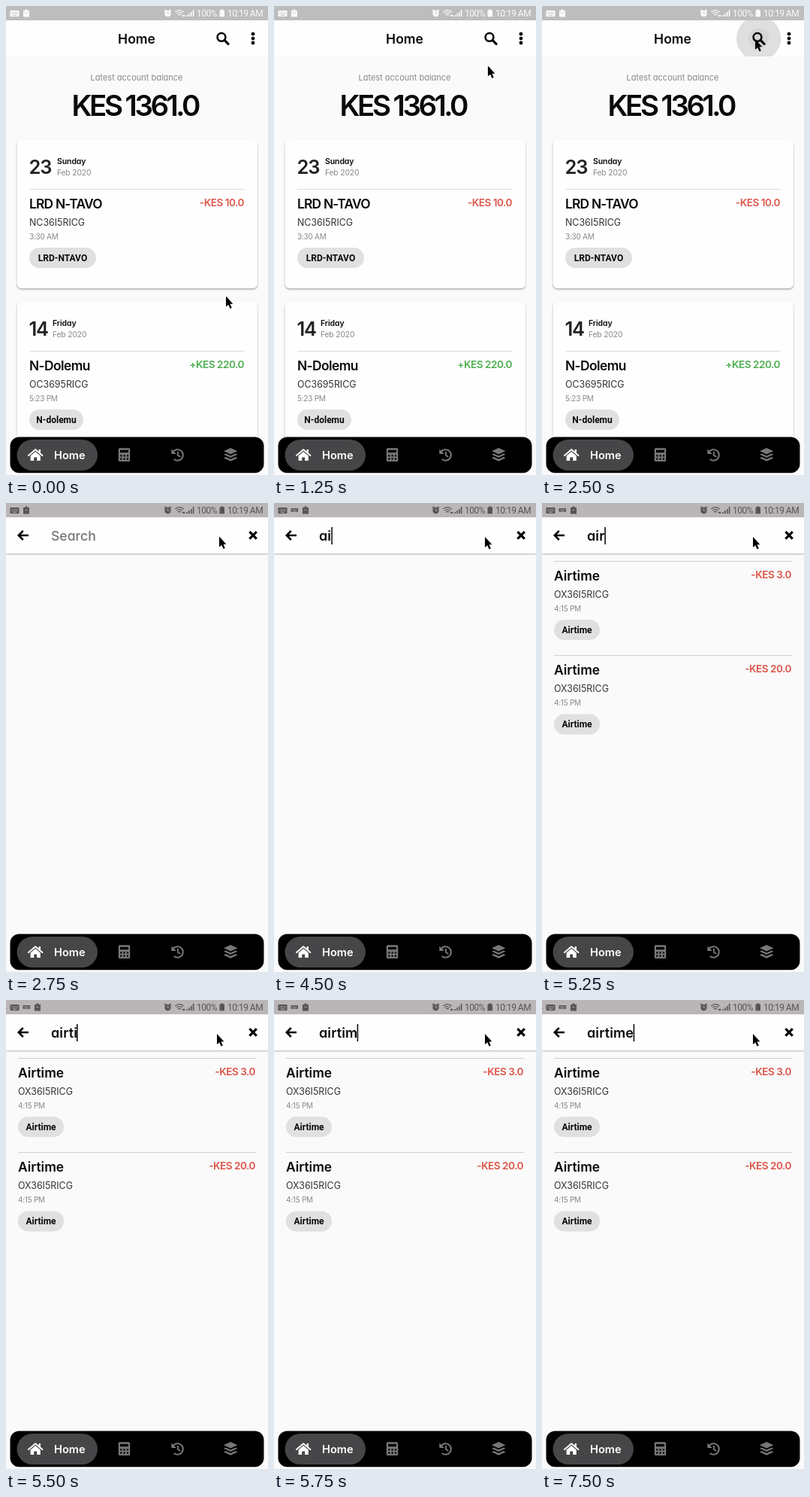
These frames come from a looping animation (349x623 px, 8000 ms). An HTML page:

```html
<!DOCTYPE html>
<html lang="en">
<head>
<meta charset="utf-8">
<title>Account search</title>
<style>
html, body { margin: 0; width: 100%; height: 100%; overflow: hidden; background: #fafafa; }
svg { display: block; width: 100%; height: 100%; }
text { font-family: Inter, "Open Sans", sans-serif; font-feature-settings: "cv11"; white-space: pre; }
.rb { font-family: Roboto, sans-serif; }
.m { font-weight: 500; }
.b { font-weight: 600; }
</style>
</head>
<body>
<svg id="stage" viewBox="0 0 349 623">
  <defs>
    <filter id="soft" x="-10%" y="-10%" width="120%" height="120%"><feGaussianBlur stdDeviation="1.2"/></filter>
    <clipPath id="head"><rect y="19" width="349" height="48"/></clipPath>
    <g id="board">
      <rect width="12" height="8" rx="1.2" fill="currentColor"/>
      <path d="M1.8 2.5H10.2M1.8 4.3H10.2" stroke="var(--bar)" stroke-width=".9" stroke-dasharray="1.1 .7"/>
      <path d="M3.4 6.3H8.6" stroke="var(--bar)"/>
    </g>
    <g id="cell">
      <path d="M2.5 0H5.5V1.5H8V10H0V1.5H2.5Z" fill="currentColor"/>
      <path d="M2.2 4.8H5.8" stroke="var(--bar)" stroke-width=".7"/>
    </g>
  </defs>
  <rect width="349" height="623" fill="#fafafa"/>
  <g id="home">
    <rect y="19" width="349" height="48" fill="#fefefe"/>
    <g fill="#060606">
      <circle cx="329" cy="37.2" r="2.4"/><circle cx="329" cy="43.1" r="2.4"/><circle cx="329" cy="49" r="2.4"/>
    </g>
    <g clip-path="url(#head)">
      <circle id="wave" cx="288.7" cy="43" r="29.7" fill="#000" opacity=".12"/>
      <circle id="press" cx="288.7" cy="43" r="14" fill="#000" opacity=".04"/>
    </g>
    <circle cx="287" cy="41.4" r="5.4" fill="none" stroke="#060606" stroke-width="2.6"/>
    <path d="M291 45.4L296 50.4" stroke="#060606" stroke-width="3.2" stroke-linecap="round"/>
  </g>
  <g id="search">
    <g id="results"></g>
    <rect y="20" width="349" height="48" fill="#000" opacity=".28" filter="url(#soft)"/>
    <rect y="19" width="349" height="48" fill="#fefefe"/>
    <path d="M30 43H17M22.8 37L16.8 43L22.8 49" fill="none" stroke="#060606" stroke-width="2.6"/>
    <path d="M324.4 38.2L333.8 47.6M333.8 38.2L324.4 47.6" stroke="#060606" stroke-width="3.2"/>
    <rect id="caret" y="32" width="1.6" height="23" fill="#111"/>
  </g>
  <g id="nav">
    <rect x="5.5" y="572.6" width="338" height="47.6" rx="12" fill="#000"/>
    <rect x="14.5" y="576" width="107.5" height="41" rx="20.5" fill="#464547"/>
    <path d="M30 597L39.2 589.3L48.4 597" fill="none" stroke="#fff" stroke-width="2" stroke-linejoin="round" stroke-linecap="round"/>
    <path d="M43.6 589H46V594L43.6 592Z" fill="#fff"/>
    <path d="M32.6 597.4L39.2 591.9L45.8 597.4V604H41.2V599.5H37.2V604H32.6Z" fill="#fff"/>
    <rect x="149.8" y="587.3" width="15.4" height="17.8" rx="1.6" fill="#777"/>
    <path d="M152 591.5H163" stroke="#000" stroke-width="3.4"/>
    <path d="M152.2 597.3H163M152.2 601.7H163" stroke="#000" stroke-width="2.2" stroke-dasharray="2.2 2.1"/>
    <g fill="none" stroke="#777">
      <path d="M222.6 592.2A7.3 7.3 0 1 1 223.7 602" stroke-width="2.1"/>
      <path d="M229 592V596.7L232.2 599" stroke-width="1.9"/>
    </g>
    <g fill="#777">
      <path d="M220.3 588.4V595H226.9Z"/>
      <path d="M299.2 587L308.4 591.2L299.2 595.4L290 591.2Z"/>
      <path id="sheet" d="M292.6 594.5L299.2 597.5L305.8 594.5L308.4 595.8L299.2 600.1L290 595.8Z"/>
      <use href="#sheet" y="4.6"/>
    </g>
  </g>
  <g id="status">
    <rect width="349" height="19" style="fill:var(--bar)"/>
    <use href="#board" x="5.5" y="6"/>
    <use id="mini" href="#board" transform="translate(22.5 7) scale(.8 .6)"/>
    <use id="pack" href="#cell" x="23" y="4.5"/>
    <g fill="none" stroke="currentColor" stroke-width="1.2">
      <circle cx="215.5" cy="10" r="3.6" fill="currentColor"/>
      <path d="M211 7L213.3 4.8M220 7L217.7 4.8" stroke-width="1.6"/>
      <path d="M215.5 7.8V10.2H217.3" style="stroke:var(--bar)" stroke-width=".9"/>
      <path d="M225.3 8A8 8 0 0 1 236.7 8M227.2 10.2A5.2 5.2 0 0 1 234.8 10.2M229 12.2A2.8 2.8 0 0 1 233 12.2"/>
      <path d="M235 12.8H238.4" stroke-width="2"/>
      <path d="M241.2 14V12M244 14V10M246.8 14V8M249.6 14V5" stroke-width="1.6"/>
    </g>
    <path d="M286 4.5H289.5V5.7H291V14.3H284.5V5.7H286Z" fill="currentColor"/>
  </g>
  <path id="pointer" d="M0 0V14L3.2 11.2L5.6 16.6L7.8 15.6L5.5 10.3H9.4Z" fill="#000"/>
</svg>
<script>
const NS = "http://www.w3.org/2000/svg";
const $ = id => document.getElementById(id);

function add(parent, tag, attrs) {
  const el = document.createElementNS(NS, tag);
  for (const k in attrs) el.setAttribute(k, attrs[k]);
  return parent.appendChild(el);
}

function label(parent, str, x, y, size, fill, more) {
  const el = add(parent, "text", { x, y, "font-size": size, fill, ...more });
  el.textContent = str;
  return el;
}

const bold = gap => ({ class: "b", "letter-spacing": gap });
const RED = "#dc5548", GREEN = "#4caf50", INK = "#0a0a0a", GREY = "#888";

// One transaction: title, amount, code, time and tag
function entry(parent, x, y, right, item) {
  label(parent, item.name, x, y, 17.4, INK, bold(item.gap));
  label(parent, item.sum, right, y - 3, 13.6, item.sum[0] === "+" ? GREEN : RED,
    { ...bold(-.5), "text-anchor": "end" });
  label(parent, item.code, x, y + 22.5, 12.4, "#333");
  label(parent, item.time, x, y + 40.5, 10, GREY, { "letter-spacing": -.25 });
  add(parent, "rect", { x, y: y + 52, width: item.w, height: 27, rx: 13.5, fill: "#e0e0e1" });
  label(parent, item.tag, x + item.w / 2, y + 69.7, 12, INK,
    { class: "rb", "font-weight": 700, "text-anchor": "middle" });
}

function card(y, day, week, x, item) {
  const g = $("home");
  const box = { x: 14.5, width: 320.5, height: 197, rx: 6 };
  add(g, "rect", { ...box, y: y + 1.5, fill: "#000", opacity: .32, filter: "url(#soft)" });
  add(g, "rect", { ...box, y, fill: "#fefefe" });
  label(g, day, 30.5, y + 44.8, 25.5, "#222", bold(-1.2));
  label(g, week, x, y + 31.5, 10.5, INK, bold(-.1));
  label(g, "Feb 2020", x, y + 47, 10.3, GREY, { "letter-spacing": -.15 });
  add(g, "rect", { x: 31, y: y + 65, width: 287, height: 1, fill: "#dcdcdc" });
  entry(g, 31, y + 91, 317, item);
}

label($("home"), "Home", 174, 49.5, 17.5, INK, { ...bold(0), "text-anchor": "middle" });
label($("home"), "Latest account balance", 174, 99, 11, GREY, { "text-anchor": "middle" });
label($("home"), "KES 1361.0", 87.5, 145.5, 38.5, INK, bold(-3.5));
card(178, "23", "Sunday", 68, { name: "LRD N-TAVO", gap: -.8, sum: "-KES 10.0",
  code: "NC36I5RICG", time: "3:30 AM", tag: "LRD-NTAVO", w: 89 });
card(393, "14", "Friday", 62, { name: "N-Dolemu", gap: -.6, sum: "+KES 220.0",
  code: "OC3695RICG", time: "5:23 PM", tag: "N-dolemu", w: 72 });

["-KES 3.0", "-KES 20.0"].forEach((sum, i) => {
  const y = 77 + i * 125.4;
  add($("results"), "rect", { x: 16, y: Math.round(y - .4), width: 317, height: 1, fill: "#cfcfcf" });
  entry($("results"), 16, y + 26, 332, { name: "Airtime", gap: 0, sum,
    code: "OX36I5RICG", time: "4:15 PM", tag: "Airtime", w: 61 });
});

label($("nav"), "Home", 64, 601.5, 14.6, "#fff", bold(0));
for (const [str, x] of [["100%", 254], ["10:19 AM", 295]])
  label($("status"), str, x, 14, 12, "currentColor", { class: "rb", "letter-spacing": -.5 });
const hint = label($("search"), "Search", 60, 49.5, 17.6, "#757575", { class: "m" });
const query = label($("search"), "", 60, 49.5, 18, INK, bold(.1));

const LOOP = 8000, TICK = 250, WORD = "airtime";
const caretX = [60.8, 70, 76.3, 83.3, 90, 94, 110.6, 121.6];
const typed = [[4500, 2], [5000, 3], [5500, 5], [5750, 6], [6250, 7]];
const show = (el, on) => el.setAttribute("display", on ? "inline" : "none");
const mix = (a, b, p) => a + (b - a) * p;

function draw(now) {
  // the screen refreshes four times a second
  const t = Math.floor(now % LOOP / TICK) * TICK;
  const open = t >= 2750, keys = t >= 3000;
  show($("home"), !open);
  show($("search"), open);
  show($("results"), t >= 5250);
  show($("mini"), keys);
  $("pack").setAttribute("x", keys ? 38 : 23);
  $("stage").style.setProperty("--bar", open ? "#bab6b8" : "#bdbdbd");
  $("status").style.color = open ? "#585355" : "#fafafa";

  show($("wave"), t >= 2250);
  $("wave").setAttribute("r", t < 2500 ? 18 : 29.7);
  show($("press"), t >= 2500);

  let n = 0;
  for (const [at, count] of typed) if (t >= at) n = count;
  query.textContent = WORD.slice(0, n);
  show(hint, !n);
  const blink = (t >= 3500 && t < 4000) || (t >= 6500 && t < 7000);
  show($("caret"), keys && !blink);
  $("caret").setAttribute("x", caretX[n]);

  const p = Math.min(1, Math.max(0, (t - 250) / 1250));
  const e = p * p * (3 - 2 * p);
  const x = keys ? 281 : mix(293, 284, e);
  const y = keys ? 45 : open ? 44.5 : mix(385.5, 44, e);
  $("pointer").setAttribute("transform", `translate(${x} ${y})`);
}

const start = performance.now();
function frame() {
  draw(performance.now() - start);
  requestAnimationFrame(frame);
}
draw(0);
requestAnimationFrame(frame);
</script>
</body>
</html>
```
